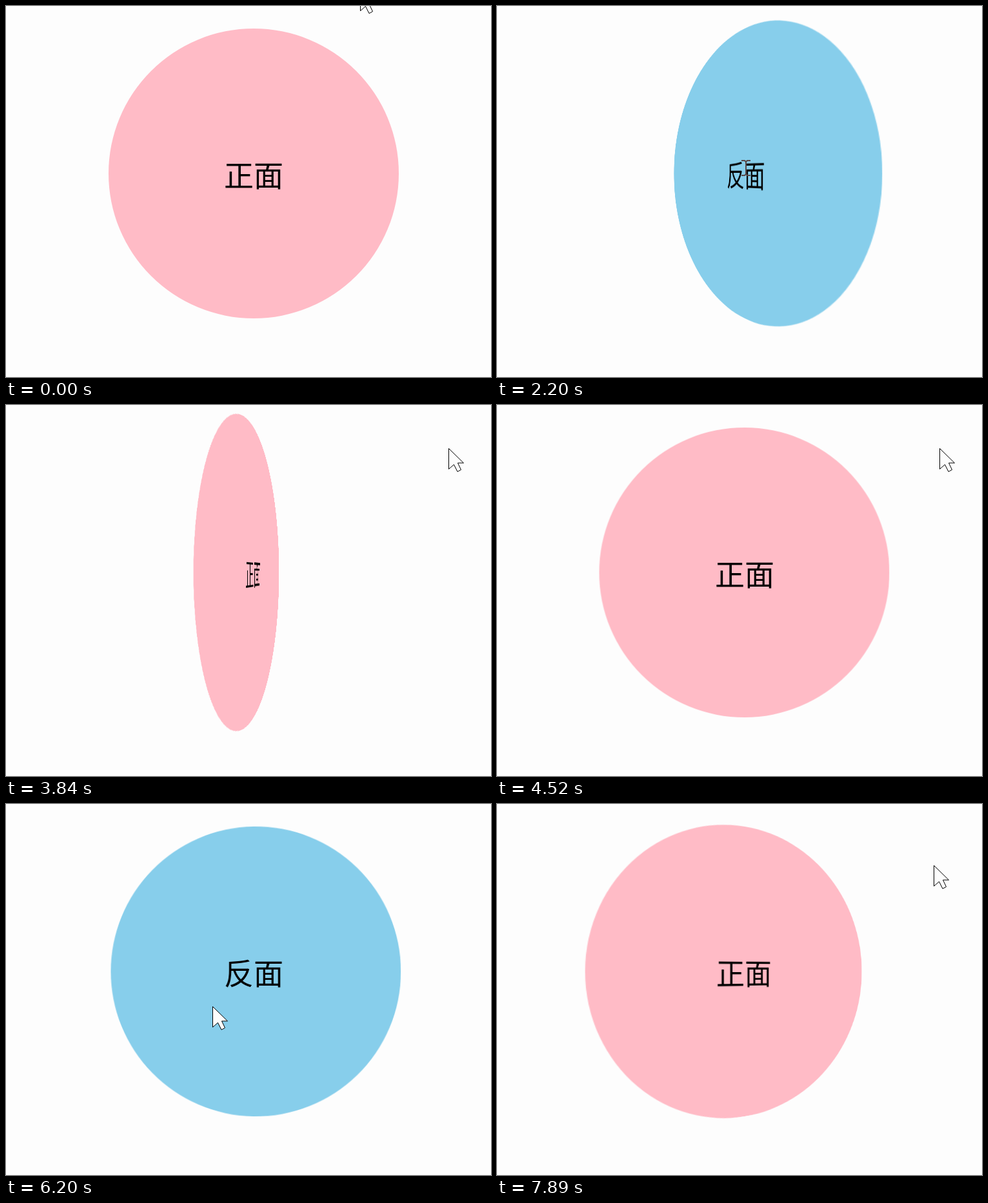
Recreate the animation shown at these times as an HTML page. Size 752x576 px, loop 7990 ms.

```html
<!DOCTYPE html>
<html lang="zh">
<head>
<meta charset="utf-8">
<style>
html, body { margin: 0; width: 100%; height: 100%; overflow: hidden; background: #fdfdfd; }
.stage { position: relative; width: 100%; height: 100%; overflow: hidden; contain: strict; }
.scene { position: absolute; left: 159px; top: 35px; width: 450px; height: 450px; perspective: 536px; }
.card { width: 100%; height: 100%; transform-style: preserve-3d; }
.face {
  position: absolute; inset: 0; border-radius: 50%; backface-visibility: hidden;
  font: 46px/450px "Noto Sans CJK SC", "Noto Sans CJK", sans-serif; text-align: center; color: #000;
}
.front { background: #ffbbc6; }
.back { background: skyblue; transform: rotateY(180deg); }
svg { position: absolute; inset: 0; width: 100%; height: 100%; }
</style>
</head>
<body>
<div class="stage">
  <div class="scene">
    <div class="card" id="card">
      <div class="face front">正面</div>
      <div class="face back">反面</div>
    </div>
  </div>
  <svg>
    <g id="pointer">
      <path id="arrow" d="M.5.5V32.5L8.5 25.5 14 36.5 19.5 33.5 14.5 23H23.5Z" fill="#fdfdfd" stroke="#000"/>
      <path id="beam" d="M-7-11H-2L0-9 2-11H7M0-9V10M-7 12H-2L0 10 2 12H7" fill="none" stroke="#5a4a4a" stroke-width="2"/>
    </g>
  </svg>
</div>
<script>
const LOOP = 7990, FLIP = 1075;

// Each gesture moves the pointer on, in one leg or by way of "via",
// and may flip the card when the pointer crosses the rim.
const gestures = [
  { start: -10, to: [692, 82], time: 1000 },
  { start: 1220, via: [473, 178], viaTime: 560, to: [386, 251], time: 980, flip: 1738 },
  { start: 2960, to: [686, 67], time: 930, flip: 3533 },
  { start: 4940, via: [349, 295], viaTime: 560, to: [320, 314], time: 1260, flip: 5276 },
  { start: 6590, to: [677, 95], time: 970, flip: 7305 }
];
let at = [549, -25], side = 0;
for (const g of gestures) {
  g.from = at;
  g.side = side;
  at = g.to;
  if (g.flip) side = 1 - side;
  g.nextSide = side;
}

const $ = id => document.getElementById(id);
const clamp = k => Math.min(1, Math.max(0, k));
const mix = (a, b, k) => a + (b - a) * k;
const mixPoint = (a, b, k) => a.map((v, i) => Math.round(mix(v, b[i], k)));
const smooth = k => k * k * (3 - 2 * k);
const easeIn = k => k ** 3;
const easeOut = k => 1 - easeIn(1 - k);
const bezier = (a, b, u) => 3 * a * u * (1 - u) ** 2 + 3 * b * u * u * (1 - u) + u ** 3;

// CSS "ease" curve
function cssEase(x) {
  let lo = 0, hi = 1;
  for (let i = 0; i < 24; i++) {
    const mid = (lo + hi) / 2;
    if (bezier(.25, .25, mid) < x) lo = mid; else hi = mid;
  }
  return bezier(.1, 1, hi);
}

// Even steps of motion, shown in a 20, 20, 100 ms rhythm
function stepped(d) {
  const r = d % 140, step = r < 20 ? 0 : r < 40 ? 1 : 2;
  return (Math.floor(d / 140) * 3 + step) * 140 / 3;
}

function pointerAt(g, d) {
  if (!g.via) return mixPoint(g.from, g.to, smooth(clamp(d / g.time)));
  if (d < g.viaTime) return mixPoint(g.from, g.via, easeIn(clamp(d / g.viaTime)));
  return mixPoint(g.via, g.to, easeOut(clamp((d - g.viaTime) / (g.time - g.viaTime))));
}

function draw(t) {
  const g = gestures.findLast(g => g.start <= t);
  const d = stepped(t - g.start);
  const turn = g.flip ? cssEase(clamp((g.start + d - g.flip) / FLIP)) : 0;
  $("card").style.transform = `rotateY(${mix(g.side, g.nextSide, turn) * 180}deg)`;

  const [x, y] = pointerAt(g, d);
  const onText = Math.abs(x - 384) < 45 && Math.abs(y - 262) < 30;
  $("pointer").setAttribute("transform", `translate(${x} ${y})`);
  $("arrow").style.display = onText ? "none" : "";
  $("beam").style.display = onText ? "" : "none";
}

const begin = performance.now();
function tick() {
  draw((performance.now() - begin) % LOOP);
  requestAnimationFrame(tick);
}
tick();
</script>
</body>
</html>
```
